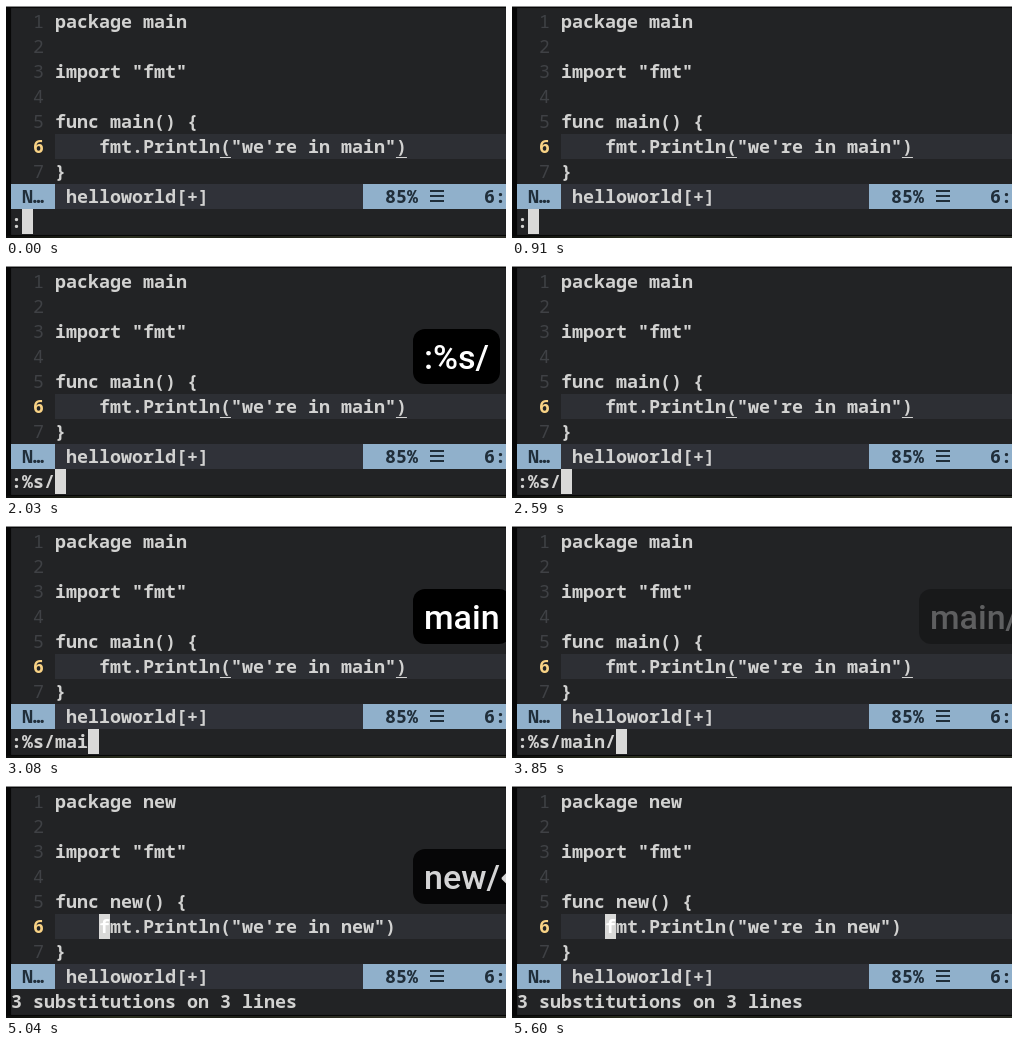
Animation of 500x232 px, one loop 5.67 s. Source, as an HTML page:

```html
<!DOCTYPE html>
<html lang="en">
<head>
<meta charset="utf-8">
<title>Substitute in the editor</title>
<style>
  html, body { margin: 0; width: 100%; height: 100%; overflow: hidden; background: #0b0b0b; }
  #stage {
    position: relative; width: 500px; height: 232px; overflow: hidden;
    background: linear-gradient(90deg, #0d0e0c, #2c3020 25%, #1d1f18 50%, #3a3a2c 78%, #2a2b24);
    font: 600 18.333px/25px "Noto Sans Mono", monospace; color: #d2d2d1; white-space: pre;
  }
  #window {
    position: absolute; inset: 0 0 2px 0; background: #222325;
    border: solid #070707; border-width: 2px 0 1px 5px; box-shadow: inset 0 0 1px #0a0a0a;
  }
  #window::before { content: ""; position: absolute; inset: -2px 0 auto -5px; height: 1px; background: #8a8a8a; }
  .row { position: absolute; left: 5px; right: 0; height: 25px; }
  .row > * { position: absolute; top: 0; height: 25px; line-height: 23px; }
  .number { left: 22px; color: #3f4145; font-weight: 500; }
  .code { left: 44px; }
  .current .code { right: 0; background: #2d2f34; }
  .current .number { color: #f8d285; font-weight: 700; }
  .match { text-decoration: underline 1px; text-underline-offset: 4px; }
  .cursor { display: inline-block; vertical-align: top; min-width: 11px; height: 25px; background: #d9d9d8; color: #fff; }
  #status { top: 178px; background: #303239; }
  .blue { background: #90b0cb; color: #202e3a; }
  #menu { left: 419px; top: 6px; width: 14px; height: 12px; background: repeating-linear-gradient(#202e3a 0 2px, transparent 2px 5px); }
  #keys {
    position: absolute; left: 407px; top: 63px; height: 55px; padding: 0 11px; border-radius: 12px;
    background: #000; color: #fff; font: 500 34px/56px Roboto, sans-serif;
  }
</style>
</head>
<body>
<div id="stage">
  <div id="window"></div>
  <div id="lines"></div>
  <div class="row" id="status">
    <span class="blue" style="left:0;width:44px"> N…</span>
    <span style="left:55px">helloworld[+]</span>
    <span class="blue" style="left:352px;right:0">  85%</span>
    <i id="menu"></i>
    <span style="left:473px;color:#202e3a">6:</span>
  </div>
  <div class="row" style="top:203px"><span id="command" style="left:0"></span></div>
  <div id="keys"></div>
</div>
<script>
const LOOP = 5670, STEP = 70, RUN_AT = 4690;
const $ = id => document.getElementById(id);

// Each entry: start time, text, character under the cursor
const commands = [
  [0, ":"], [1400, ":", "%"], [1470, ":%"], [1750, ":%s"], [1960, ":%s/"],
  [3010, ":%s/ma"], [3080, ":%s/mai"], [3150, ":%s/main"], [3290, ":%s/main/"],
  [3990, ":%s/main/n"], [4060, ":%s/main/ne"], [4130, ":%s/main/new"], [4200, ":%s/main/new/"]
];

const presses = [
  [0, ""], [1050, ":"], [1330, ":%"], [1680, ":%s"], [1890, ":%s/"],
  [2940, "m"], [3010, "ma"], [3080, "main"], [3220, "main/"],
  [3920, "n"], [3990, "ne"], [4060, "new"], [4130, "new/"], [4550, "new/↩"]
];
const HOLD = 440, FADE = 260;

const latest = (list, t) => list.findLast(([start]) => start <= t);
const cursor = (char = " ") => `<span class="cursor">${char}</span>`;
const match = char => `<span class="match">${char}</span>`;

function codeLines(word, done) {
  const call = done
    ? `    ${cursor("f")}mt.Println("we're in ${word}")`
    : `    fmt.Println${match("(")}"we're in ${word}"${match(")")}`;
  return [`package ${word}`, "", 'import "fmt"', "", `func ${word}() {`, call, "}"];
}

function linesHtml(done) {
  return codeLines(done ? "new" : "main", done).map((code, i) =>
    `<div class="row${i === 5 ? " current" : ""}" style="top:${3 + 25 * i}px">` +
    `<span class="number">${i + 1}</span><span class="code">${code}</span></div>`).join("");
}

const shown = {};
function setHtml(id, html) {
  if (shown[id] !== html) $(id).innerHTML = shown[id] = html;
}

function draw(now) {
  const t = Math.floor((now % LOOP) / STEP) * STEP;
  const done = t >= RUN_AT;
  const [, text, under] = latest(commands, t);
  setHtml("lines", linesHtml(done));
  setHtml("command", done ? "3 substitutions on 3 lines" : text + cursor(under));

  const [pressed, keys] = latest(presses, t);
  const faded = Math.max(0, t - pressed - HOLD) / FADE;
  setHtml("keys", keys);
  $("keys").style.opacity = keys ? Math.max(0, 1 - faded) : 0;
}

const begin = performance.now();
function tick() {
  draw(performance.now() - begin);
  requestAnimationFrame(tick);
}
tick();
</script>
</body>
</html>
```
